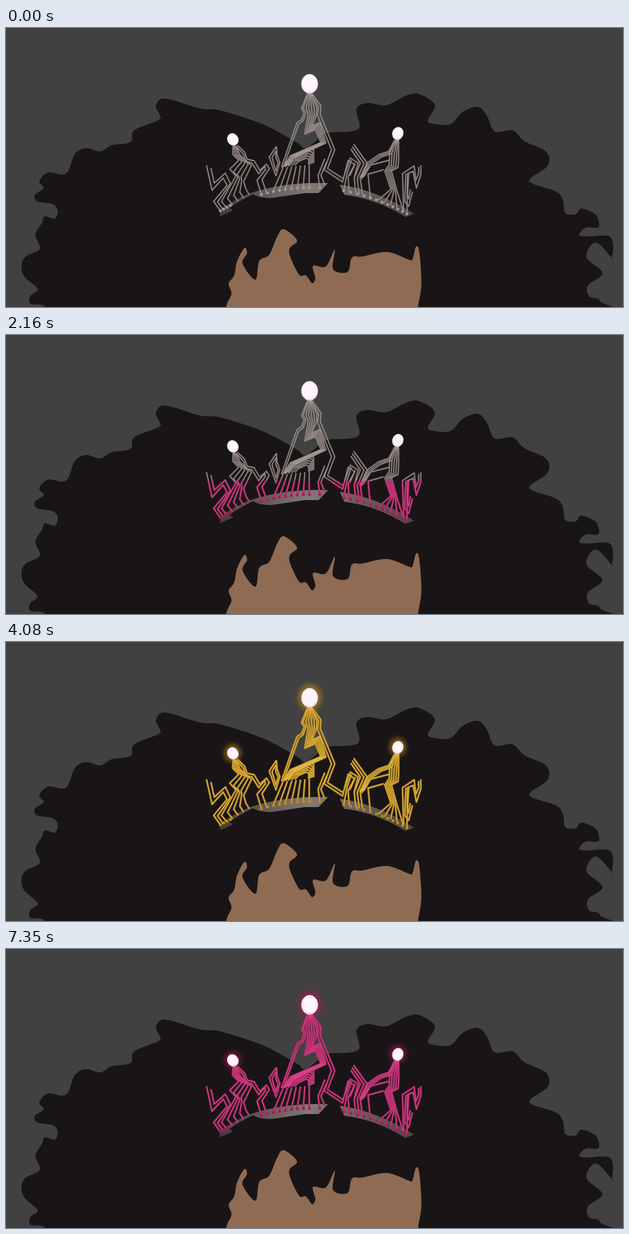
An HTML page that plays this animation: 1111x502 px, repeating every 8 s.

```html
<!DOCTYPE html>
<html lang="en">
<head>
<meta charset="utf-8">
<title>Circuit crown</title>
<style>
html, body { margin: 0; width: 100%; height: 100%; overflow: hidden; background: #414141; }
svg { display: block; width: 100%; height: 100%; }
.halo, .core { fill: none; stroke-linejoin: round; }
.halo { stroke: var(--halo); stroke-width: 3.4; }
.core { stroke: var(--core); stroke-width: 1.4; }
.dots { fill: var(--dot); }
.glow { fill: var(--dot); filter: blur(4px); opacity: .6; }
.plain { --core: #a0948f; --halo: #8d838055; --dot: #a39792; }
</style>
</head>
<body>
<svg viewBox="0 0 1111 502">
  <defs>
    <linearGradient id="metal" gradientUnits="userSpaceOnUse" x1="385" x2="735" y1="0" y2="0">
      <stop offset="0" stop-color="#423b3c"/>
      <stop offset=".46" stop-color="#827975"/>
      <stop offset="1" stop-color="#4c4445"/>
    </linearGradient>
    <radialGradient id="pearl" cx=".5" cy=".4" r=".62">
      <stop offset=".7" stop-color="#fdf4fc"/>
      <stop offset="1" stop-color="#f1d3e2"/>
    </radialGradient>
    <clipPath id="rise"><rect id="level" width="1111" height="502"/></clipPath>
    <g id="wires"><path class="halo"/><path class="core"/></g>
    <g id="dots" class="dots"></g>
    <g id="glow" class="glow">
      <ellipse cx="547" cy="100" rx="21" ry="24"/>
      <ellipse cx="408" cy="200" rx="15" ry="16"/>
      <ellipse cx="705.5" cy="189" rx="15" ry="16"/>
    </g>
  </defs>
  <rect width="1111" height="502" fill="#414141"/>
  <path id="hair" fill="#191517"/>
  <path id="face" fill="#8f6b53"/>
  <g fill="url(#metal)">
    <path d="M385 339L386 326Q410 310 437 298Q505 276 580 279L563 297H538L477 306Q455 306 445 299Q423 309 402 324L409 328Z"/>
    <path d="M601 282Q667 291 735 334L719 340Q667 307 609 300Z"/>
  </g>
  <use class="plain" href="#wires"/>
  <g id="lit" clip-path="url(#rise)"><use href="#glow"/><use href="#wires"/></g>
  <use id="pads" href="#dots"/>
  <g fill="url(#pearl)" stroke="#d8c2cc" stroke-width=".7">
    <ellipse cx="546.7" cy="100.5" rx="14.8" ry="17.5"/>
    <ellipse cx="408.5" cy="200.5" rx="9.8" ry="11.2" transform="rotate(-28 408.5 200.5)"/>
    <ellipse cx="705.5" cy="189.7" rx="9.8" ry="11.6" transform="rotate(18 705.5 189.7)"/>
  </g>
</svg>
<script>
const $ = id => document.getElementById(id);
const points = text => text.trim().split(/\s+/).map(p => p.split(',').map(Number));
const range = (n, f) => Array.from({ length: n }, (_, i) => f(i));

// Closed Catmull-Rom curve; a doubled point makes a corner.
function smooth(pts) {
  const at = i => pts[(i + pts.length) % pts.length];
  const handle = (i, s) => at(i).map((v, k) => (v + s * (at(i + 1)[k] - at(i - 1)[k]) / 6).toFixed(1));
  return 'M' + pts[0] + pts.map((_, i) => `C${handle(i, 1)} ${handle(i + 1, -1)} ${at(i + 1)}`).join('') + 'Z';
}

const hairLeft = `70,540 70,502 44,496 44,482 57,470 33,447 28,426 36,411 61,397 53,372 65,350 70,339 88,343 93,328
  84,317 56,312 52,300 68,288 60,276 76,260 108,262 124,227 144,216 170,222 190,211 224,205 231,184
  274,166 277,157 270,140 287,127 350,145 385,148 462,173 522,205`;
const hairRight = `540,216 570,193 582,188 634,182 631,146 650,135 684,139 720,122 744,119 772,138 760,165 768,172
  800,173 822,151 850,142 866,158 880,186 912,184 934,204 972,222 976,247 945,270 948,280 990,294
  1003,310 1007,333 1026,335 1036,325 1062,336 1067,358 1044,359 1032,372 1046,375 1084,374 1093,390
  1091,414 1091,414 1067,388 1053,391 1046,414 1074,441 1048,463 1050,483 1070,492 1072,540`;
const face = `392,540 397,500 406,478 401,460 411,445 416,420 429,396 434,405 426,424 449,453 456,419 474,408
  488,376 500,362 524,382 511,396 512,412 528,444 540,445 551,459 557,450 553,428 576,429 592,399
  589,434 615,439 623,413 642,411 686,403 726,417 732,416 738,394 744,402 748,460 742,502 740,540`;
$('hair').setAttribute('d', smooth(points(hairLeft + ' ' + hairRight)));
$('face').setAttribute('d', smooth(points(face)));

// A bundle of wires blends evenly from one edge strand to the other.
const wires = [];
function bundle(count, first, last) {
  const [a, b] = [points(first), points(last)];
  wires.push(...range(count, i => a.map((p, j) => p.map((v, k) => v + (b[j][k] - v) * i / (count - 1)))));
}

// Left spire
bundle(2, '386,329 374,312 398,283 391,270 371,292 361,247', '391,327 381,313 404,280 395,261 375,279 369,252');
bundle(5, '409,212 408,227 419,238 403,254 414,266 388,312 398,324', '415,212 421,228 442,247 430,272 428,276 432,290 438,300');
bundle(2, '415,213 428,228 432,240 443,243 455,262 466,249 467,255 452,274 460,300',
  '417,211 430,224 434,236 447,239 457,256 469,245 474,253 461,273 470,298');
bundle(2, '487,213 474,232 486,266 493,242 488,228 487,213', '486,221 479,233 486,257 490,243 486,234 486,221');
// Middle spire
bundle(2, '543,118 532,145 537,153 532,165 524,170 496,250', '544,118 535,145 540,153 535,167 527,173 501,246');
bundle(5, '546,118 540,145 544,154 538,191 557,183 567,206 512,230 499,250', '550,118 560,143 559,156 551,176 565,170 576,207 520,233 508,247');
bundle(5, '497,251 508,238 548,217 554,220 554,243', '520,247 527,240 541,234 545,236 545,246');
bundle(2, '549,118 563,142 561,157 586,219 573,255 606,277 616,238 628,246 619,266',
  '551,118 567,140 566,156 592,219 579,253 607,271 620,234 634,243 627,270');
bundle(7, '480,296 499,251', '546,287 546,246');
bundle(2, '565,287 562,265 574,235', '574,282 567,265 578,240');
// Right spire
bundle(3, '626,209 651,244 638,271 642,300', '621,218 638,243 627,270 630,298');
bundle(2, '608,293 614,262 622,238', '618,295 616,268 629,243');
bundle(3, '700,201 689,222 671,228 650,243 637,270', '704,201 694,226 676,232 658,244 644,268');
bundle(2, '690,238 655,247 640,272', '680,255 652,263 656,306');
bundle(5, '702,201 691,222 690,246 682,257 693,290 670,310', '707,201 707,235 706,251 694,257 704,293 715,328');
bundle(2, '747,247 747,264 739,288 733,258 723,262 722,335', '743,250 743,262 738,274 735,248 714,262 716,330');
bundle(2, '720,262 718,312 725,321 732,294', '725,262 723,300 725,308 728,290');

const wirePath = wires.map(w => 'M' + w.join('L')).join('');
document.querySelectorAll('#wires path').forEach(p => p.setAttribute('d', wirePath));

// Solder dots follow the curve of the band.
const dots = [
  ...range(4, i => [386 + 6 * i, 329 - 3.2 * i]),
  ...range(9, i => [460 + 10.8 * i, 287 + .2 * (8 - i) ** 2]),
  [565, 287],
  ...range(12, i => {
    const d = 13 * i - .24 * i * i;
    return [608 + d, 293 + .18 * d + .0016 * d * d];
  }),
];
$('dots').innerHTML = dots.map(([x, y]) => `<circle cx="${x}" cy="${y}" r="2.6"/>`).join('');

const plain = ['#a0948f', '#8d838055', '#a39792'];
const pink = ['#d64084', '#98205a', '#b3135e'];
const gold = ['#e2b440', '#a07618', '#c48a0d'];
const purple = ['#8b58b8', '#4d2a75', '#5a2296'];
const blend = gold.map((c, i) => `color-mix(in srgb, ${c}, ${purple[i]})`);
const themes = [[0, plain], [1140, pink], [4080, gold], [5670, blend], [5700, purple], [7350, pink]];

// The colour climbs the band first, then speeds up the spires.
function levelAt(t) {
  if (t < 1470) return 502;
  if (t < 2250) return 336 - 88 * ((t - 1470) / 780) ** 1.43;
  return 248 - 178 * Math.min(1, (t - 2250) / 480) ** 1.6;
}

function draw(now) {
  const t = Math.floor(now % 8000 / 30) * 30;
  const theme = themes.filter(s => s[0] <= t).pop()[1];
  for (const id of ['lit', 'pads'])
    ['--core', '--halo', '--dot'].forEach((name, i) => $(id).style.setProperty(name, theme[i]));
  $('level').setAttribute('y', levelAt(t));
  requestAnimationFrame(draw);
}
draw(0);
</script>
</body>
</html>
```
